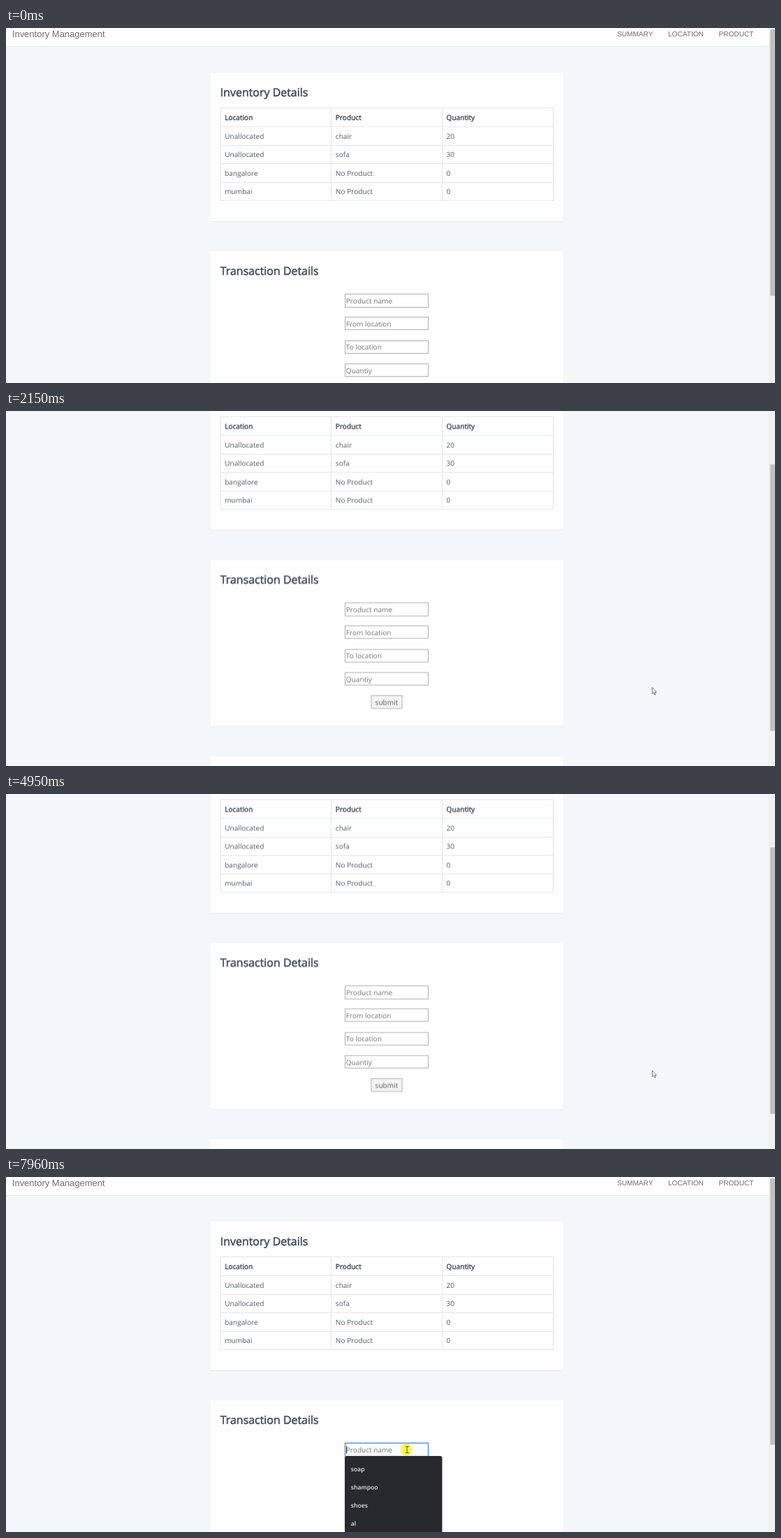
Write an HTML page that moves like this. It is 1101 px wide and 509 px high and loops after 8 s.

```html
<!DOCTYPE html>
<html lang="en">
<head>
<meta charset="utf-8">
<title>Inventory Management</title>
<style>
html, body { margin: 0; width: 100%; height: 100%; overflow: hidden; background: #f3f7fa; }
svg { display: block; width: 1101px; height: 509px; }
text { font: 10.1px "Open Sans", sans-serif; fill: #545b68; white-space: pre; text-rendering: geometricPrecision; }
.nav { font: 10.1px "Liberation Sans", Arial, sans-serif; fill: #6c6c6c; }
.brand { font-size: 12.99px; }
.title { font-size: 15.95px; fill: #3a465c; stroke: #3a465c; stroke-width: .5px; }
.head { fill: #364054; stroke: #364054; stroke-width: .34px; }
.hint { fill: #757575; }
.item { font-size: 8.6px; font-weight: 600; fill: #e8eaed; }
.card { fill: #fefefe; }
.edge { fill: #e6eaed; }
.line { fill: none; stroke: #e4e6e8; stroke-width: 1; }
.box { fill: #fefefe; stroke: #b0b0b0; stroke-width: 1; }
</style>
</head>
<body>
<svg id="stage" viewBox="0 0 1101 509">
  <g id="page"></g>
  <rect x="1092" width="9" height="509" fill="#f1f1f1"/>
  <rect id="thumb" x="1094" y="2" width="7" height="382" fill="#c1c1c1"/>
  <g id="focus">
    <rect x="485.5" y="381.5" width="119" height="19" fill="none" stroke="#4a86d8" stroke-width="1.3"/>
    <rect x="487" y="385.5" width=".9" height="11" fill="#222"/>
    <circle cx="573" cy="391" r="8.4" fill="#fdf650"/>
  </g>
  <g id="menu"></g>
  <g id="arrow">
    <path d="M.4 .4V9.6L2.5 7.7L4 11L5.3 10.4L3.9 7.1H6.5Z" fill="#fff" stroke="#3a3a3a" stroke-width=".7"/>
  </g>
  <g id="beam">
    <path d="M-2.5 -4.5H-.7L0 -4L.7 -4.5H2.5M0 -4V4M-2.5 4.5H-.7L0 4L.7 4.5H2.5" fill="none" stroke="#333" stroke-width=".9"/>
  </g>
</svg>
<script>
const LOOP = 8000;
const $ = id => document.getElementById(id);

function add(parent, tag, attrs, content) {
  const el = document.createElementNS("http://www.w3.org/2000/svg", tag);
  for (const k in attrs) el.setAttribute(k, attrs[k]);
  if (content) el.textContent = content;
  parent.append(el);
  return el;
}

// ---- page ----
const page = $("page");
const rect = (cls, x, y, width, height) => add(page, "rect", { class: cls, x, y, width, height });
const label = (cls, x, y, str, parent = page) => add(parent, "text", { class: cls, x, y }, str);

function card(top, height, title) {
  rect("edge", 292.5, top + 1, 505.2, height);
  rect("card", 292.5, top, 505.2, height);
  label("title", 306.8, top + 33.5, title);
}

function table(top, rows) {
  const cols = rows[0].length, step = 476 / cols;
  const lines = [0, 27, 54, 80.5, 107, 133.5].slice(0, rows.length + 1);
  const bottom = lines[lines.length - 1];
  let d = "";
  lines.forEach(y => { d += `M307 ${Math.floor(top + y) + .5}H783`; });
  for (let i = 0; i <= cols; i++) d += `M${Math.floor(307 + i * step) + .5} ${top}v${bottom}`;
  add(page, "path", { class: "line", d });
  rect("edge", 307, top + 27, 476, 1);
  rows.forEach((row, r) => row.forEach((str, c) =>
    label(r ? "" : "head", 313.2 + c * step, top + 17.9 + r * 26.62, str)));
}

rect("card", 0, 0, 1092, 26);
rect("edge", 0, 26, 1092, 1);
label("nav brand", 8.8, 13.2, "Inventory Management");
label("nav", 875, 12.1, "SUMMARY");
label("nav", 948, 12.1, "LOCATION");
label("nav", 1020.5, 12.1, "PRODUCT");

card(64, 213, "Inventory Details");
table(114, [
  ["Location", "Product", "Quantity"],
  ["Unallocated", "chair", "20"],
  ["Unallocated", "sofa", "30"],
  ["bangalore", "No Product", "0"],
  ["mumbai", "No Product", "0"]
]);

card(320.4, 238, "Transaction Details");
["Product name", "From location", "To location", "Quantiy"].forEach((str, i) => {
  const y = Math.round(381 + i * 33.35);
  rect("box", 485.5, y + .5, 119, i ? 18 : 19);
  label("hint", 486.8, 394.7 + i * 33.3, str);
});
rect("box", 523, 514.5, 44, 18.5).style.fill = "#f4f4f4";
label("", 528.6, 527.7, "submit");

card(602, 160, "Transaction Details");
table(653, [["transaction ID", "Timestamp", "From", "To", "product ID", "quantiy"]]);

// ---- suggestion list ----
const menu = $("menu");
add(menu, "rect", { x: 485, y: 400, width: 139.5, height: 120, rx: 3, fill: "#28292c" });
["soap", "shampoo", "shoes", "al"].forEach((str, i) => label("item", 493.8, 421.8 + i * 26, str, menu));

// ---- motion ----
// steps: [time, value], each value held until the next time
function play(el, prop, steps) {
  const frames = steps.map(([t, v]) => ({ offset: t / LOOP, [prop]: v, easing: "step-end" }));
  frames.push({ offset: 1, [prop]: steps[steps.length - 1][1] });
  el.animate(frames, { duration: LOOP, iterations: Infinity });
}
const move = (x, y) => `translate(${x}px, ${y}px)`;
const show = (el, ...times) =>
  play(el, "opacity", [[0, 0], ...times.map((t, i) => [t, 1 - i % 2])]);

const scroll = [
  [0, 0],
  [1920, 19], [2010, 66], [2080, 97], [2150, 106.5],
  [2520, 129], [2610, 178], [2700, 197],
  [4630, 194.6], [4720, 170], [4800, 134], [4870, 113], [4950, 106.5],
  [5260, 89], [5350, 41], [5420, 10], [5490, 0]
];
play(page, "transform", scroll.map(([t, y]) => [t, move(0, -y)]));
play($("thumb"), "transform", scroll.map(([t, y]) => [t, move(0, y * .7)]));

const smooth = p => p * p * (3 - 2 * p);
const path = [[0, 958, 433]];

// count positions from start to end along a quadratic curve a-b-c
function glide(start, end, count, first, a, b, c) {
  for (let i = 0; i < count; i++) {
    const p = smooth((i + first) / (count - 1 + first)), q = 1 - p;
    const at = k => q * q * a[k] + 2 * p * q * b[k] + p * p * c[k];
    path.push([start + (end - start) * i / (count - 1), at(0), at(1)]);
  }
}
glide(1140, 1370, 4, 0, [958, 433], [941.5, 414], [924.8, 396]);
glide(6100, 6800, 10, 1, [924.8, 396], [795, 336], [666, 378]);
glide(7100, 7720, 9, 1, [666, 378], [620, 382], [574.3, 391]);

const swap = path.find(p => p[1] < 605)[0];
const track = path.map(([t, x, y]) => [t, move(x, y)]);
play($("arrow"), "transform", track);
play($("beam"), "transform", track);
show($("arrow"), 1140, swap);
show($("beam"), swap);
show($("focus"), 7870);
show(menu, 7960);
</script>
</body>
</html>
```
